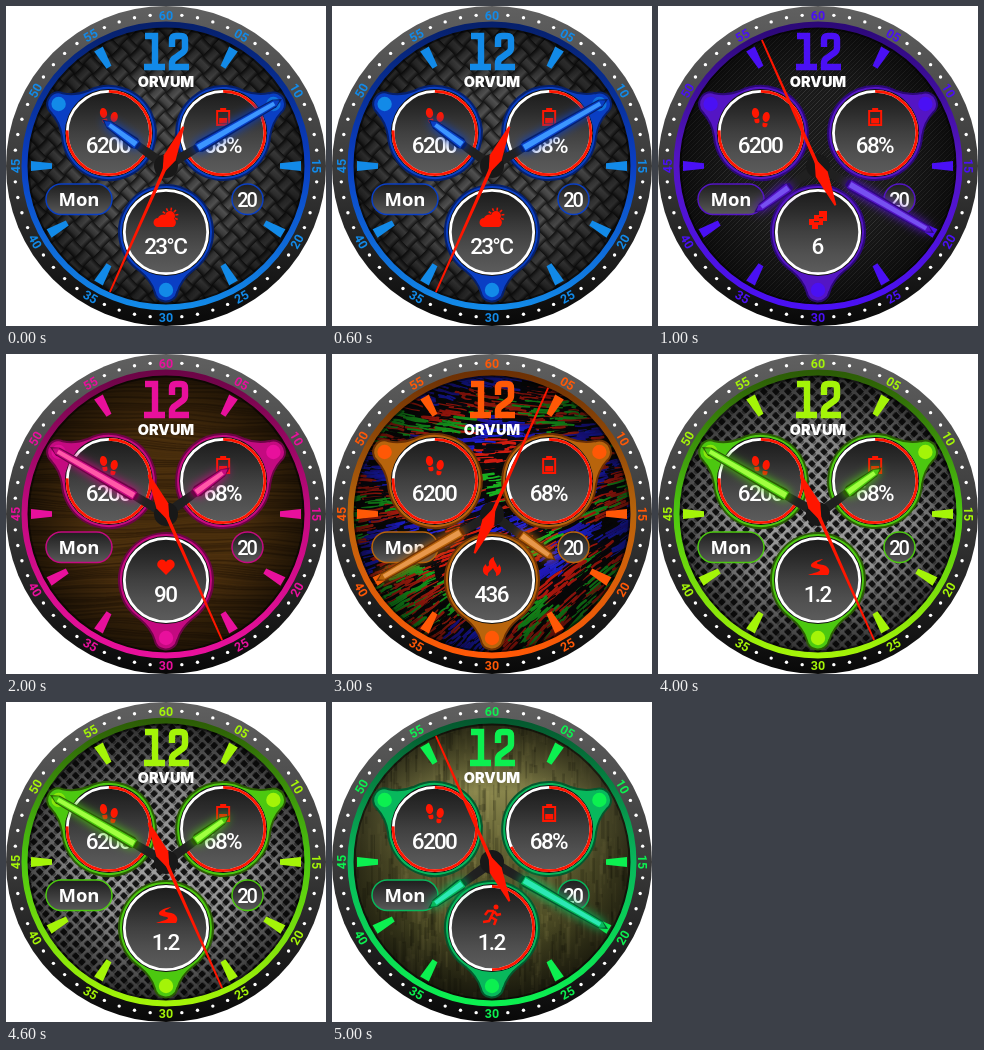
These frames come from a looping animation (320 px wide and 320 px high, 6000 ms). An HTML page with a canvas:

```html
<!DOCTYPE html>
<html lang="en">
<head>
<meta charset="utf-8">
<title>Watch face themes</title>
<style>
  html, body { margin: 0; width: 100%; height: 100%; overflow: hidden; background: #fff; }
  canvas { display: block; width: 320px; height: 320px; }
</style>
</head>
<body>
<canvas id="face" width="320" height="320"></canvas>
<script>
const g = document.getElementById('face').getContext('2d');
const TAU = Math.PI * 2;
const RED = '#ff1600';
const rad = deg => deg * Math.PI / 180;
const at = (deg, r) => [160 + r * Math.sin(rad(deg)), 160 - r * Math.cos(rad(deg))];

function seeded(seed) {
  return () => (seed = (seed * 16807) % 2147483647) / 2147483647;
}

function disc(x, y, r, fill) {
  g.beginPath();
  g.arc(x, y, r, 0, TAU);
  g.fillStyle = fill;
  g.fill();
}

function ring(x, y, r, width, color, from = 0, to = 1) {
  g.beginPath();
  g.arc(x, y, r, from * TAU - TAU / 4, to * TAU - TAU / 4);
  g.lineWidth = width;
  g.strokeStyle = color;
  g.stroke();
}

function placed(x, y, deg, draw) {
  g.save();
  g.translate(x, y);
  g.rotate(rad(deg));
  draw();
  g.restore();
}

function fade(y0, y1, ...colors) {
  const ramp = g.createLinearGradient(0, y0, 0, y1);
  colors.forEach((c, i) => ramp.addColorStop(i / (colors.length - 1), c));
  return ramp;
}

function label(text, x, y, font, color, spacing = 0) {
  g.font = font;
  g.letterSpacing = spacing + 'px';
  g.textAlign = 'center';
  g.textBaseline = 'alphabetic';
  g.fillStyle = color;
  g.fillText(text, x + spacing / 2, y);
  g.letterSpacing = '0px';
}

function polygon(points, fill) {
  g.beginPath();
  points.forEach(([x, y]) => g.lineTo(x, y));
  g.closePath();
  g.fillStyle = fill;
  g.fill();
}

// Dial textures
function base(color) {
  g.fillStyle = color;
  g.fillRect(0, 0, 320, 320);
}

function carbon() {
  base('#161616');
  placed(160, 160, 45, () => {
    const s = 13;
    for (let i = -13; i < 13; i++) for (let j = -13; j < 13; j++) {
      placed((i + .5) * s, (j + .5) * s, (i + j) & 1 ? 90 : 0, () => {
        g.fillStyle = fade(-s / 2, s / 2, '#151515', '#505050', '#404040', '#111');
        g.fillRect(-s / 2, -s / 2 + .5, s, s - 1);
      });
    }
  });
}

function pinstripe() {
  base('#191919');
  g.lineWidth = 1;
  for (let x = -320; x < 320; x += 4) {
    g.strokeStyle = x % 8 ? '#262626' : '#343434';
    g.beginPath();
    g.moveTo(x, 320);
    g.lineTo(x + 320, 0);
    g.stroke();
  }
}

function wood() {
  base('#462c0c');
  const rnd = seeded(71);
  for (let y = 0; y < 320; y += 2) {
    const dark = rnd();
    g.strokeStyle = dark > .5 ? `rgba(24,12,0,${dark * .4})` : `rgba(105,66,20,${dark * .5})`;
    g.lineWidth = 1 + rnd();
    g.beginPath();
    for (let x = 0; x <= 320; x += 10) g.lineTo(x, y + 3 * Math.sin(x / 45 + y / 31) + Math.sin(x / 17 + y / 9));
    g.stroke();
  }
}

function opal() {
  base('#0a0a0a');
  const rnd = seeded(29);
  const colors = ['#1c20d8', '#0a0a14', '#d01c10', '#0a0a0a', '#18b020', '#c02010', '#080808', '#2018b8'];
  g.lineCap = 'round';
  for (let i = 0; i < 4200; i++) {
    const x = rnd() * 320, y = rnd() * 320;
    const tilt = 30 - 90 * (y + x * .3) / 400;
    const across = y * Math.cos(rad(tilt)) - x * Math.sin(rad(tilt));
    const band = across / 13 + 1.5 * Math.sin(x / 27 + y / 41) + Math.sin(x / 15 - y / 22) + rnd() * 2;
    placed(x, y, tilt, () => {
      const half = 4 + rnd() * 8;
      g.strokeStyle = colors[(Math.floor(band) % 8 + 8) % 8];
      line(`M${-half} 0Q0 ${rnd() * 5 - 2.5} ${half} 0`, 1.2 + rnd() * 1.8);
    });
  }
  g.lineCap = 'butt';
}

function tread() {
  base(fade(20, 300, '#6a6a6a', '#a0a0a0', '#707070'));
  placed(160, 160, 45, () => {
    const s = 8.5;
    for (let i = -19; i < 19; i++) for (let j = -19; j < 19; j++) {
      g.fillStyle = 'rgba(30,30,30,.45)';
      if ((i + j) & 1) g.fillRect(i * s - 1, j * s + 1, s, 4);
      else g.fillRect(i * s + 1, j * s - 1, 4, s);
      g.fillStyle = '#141414';
      g.fillRect(i * s, j * s, 5.4, 5.4);
    }
  });
}

function grunge() {
  base(fade(20, 300, '#55532a', '#88854c', '#5c5a2e', '#4c4b24', '#34331a'));
  const rnd = seeded(53);
  for (let i = 0; i < 1300; i++) {
    g.fillStyle = rnd() > .5 ? 'rgba(18,18,6,.2)' : 'rgba(160,155,95,.12)';
    g.fillRect(rnd() * 320, rnd() * 320, 1 + rnd() * 3, 3 + rnd() * 30);
  }
}

// Icons, centred on the origin
const shape = d => g.fill(new Path2D(d));
function line(d, width) {
  g.lineWidth = width;
  g.stroke(new Path2D(d));
}

const icons = {
  feet() {
    for (const [x, y, tilt] of [[-5, -2, -10], [5, 2, 10]]) placed(x, y, tilt, () => {
      g.beginPath();
      g.ellipse(0, -2, 3.6, 5, 0, 0, TAU);
      g.fill();
      g.beginPath();
      g.roundRect(-2.4, 4, 5, 4.4, [0, 0, 2.4, 2.4]);
      g.fill();
    });
  },
  battery() {
    line('M-6 -6H6V8H-6Z', 2);
    g.fillRect(-3, -9, 6, 3);
    g.fillRect(-4, 1, 8, 5.5);
  },
  weather() {
    disc(4, -3, 5, RED);
    for (let a = -60; a < 150; a += 35) placed(4, -3, a, () => g.fillRect(-.8, -8.5, 1.6, 3));
    shape('M-8 8a4.5 4.5 0 0 1 0-9a6 6 0 0 1 11 0a4.5 4.5 0 0 1 4 9Z');
  },
  stairs() {
    shape('M-9 0H-4V-4H1V-8H9V2H5V6H0V10H-6V6H-9Z');
    g.fillStyle = '#333';
    g.fillRect(-4, 2, 5, 1.2);
    g.fillRect(1, -2, 4, 1.2);
  },
  heart() {
    shape('M0 8L-8 0C-11 -5 -4 -11 0 -5C4 -11 11 -5 8 0Z');
  },
  flame() {
    shape('M-4 9C-11 7 -10 0 -6 -3C-6 0 -4 0 -3 -2C-4 -6 -1 -9 2 -10C1 -6 5 -4 5 0C6 0 7 -1 7 -3C11 2 9 8 4 9C5 5 2 4 1 1C-1 4 -5 5 -4 9Z');
  },
  route() {
    shape('M5 -8C-1 -7 -8 -4 -7 -1C-6 2 2 1 2 3C2 5 -5 6 -10 8H10C12 5 12 2 8 -1C5 -3 -1 -2 -1 -4C-1 -5 3 -6 5 -8Z');
  },
  runner() {
    disc(4, -8, 2.5, RED);
    line('M2 -4L-1 2L4 5L2 10M-1 2L-3 6L-9 7M2 -4L-4 -4L-7 0M2 -4L5 0L9 -1', 2.5);
  }
};

// hour, minute and second are angles in degrees
const themes = [
  { main: '#128ae8', pod: '#0a3fc4', deep: '#06206c', lume: '#3c96ff', texture: carbon,
    icon: 'weather', value: '23°C', hour: 306, minute: 60, second: 204 },
  { main: '#4a10f4', pod: '#5415c4', deep: '#2c0878', lume: '#7650f0', texture: pinstripe,
    icon: 'stairs', value: '6', hour: 234, minute: 120, second: 336 },
  { main: '#e8109c', pod: '#c40a80', deep: '#6c0446', lume: '#ff58a8', texture: wood,
    icon: 'heart', value: '90', hour: 54, minute: 300, second: 156 },
  { main: '#ff5806', pod: '#b8640c', deep: '#6c3004', lume: '#e8984c', texture: opal,
    icon: 'flame', value: '436', hour: 126, minute: 240, second: 24 },
  { main: '#a4f408', pod: '#4cc810', deep: '#2c5c06', lume: '#a0ff40', texture: tread,
    icon: 'route', value: '1.2', hour: 54, minute: 300, second: 156 },
  { main: '#0cf050', pod: '#08b85c', deep: '#04582e', lume: '#2ce8b4', texture: grunge,
    icon: 'runner', value: '1.2', progress: .5, hour: 234, minute: 120, second: 336 }
];

function bezel(t) {
  disc(160, 160, 160, fade(0, 320, '#606060', '#3a3a3a', '#080808'));
  for (let m = 0; m < 60; m++) {
    const deg = m * 6;
    if (m % 5) {
      disc(...at(deg, 151.5), 1.7, '#fff');
      continue;
    }
    const flip = m > 15 && m < 45 ? 180 : 0;
    placed(...at(deg, 151), deg + flip, () =>
      label(String(m || 60).padStart(2, '0'), 0, 4.6, '700 12.5px Roboto, sans-serif', t.main));
  }
}

function dial(t) {
  g.save();
  g.beginPath();
  g.arc(160, 160, 143, 0, TAU);
  g.clip();
  t.texture();
  const shade = g.createRadialGradient(160, 160, 75, 160, 160, 143);
  shade.addColorStop(0, 'rgba(0,0,0,0)');
  shade.addColorStop(1, 'rgba(0,0,0,.6)');
  g.fillStyle = shade;
  g.fillRect(0, 0, 320, 320);
  g.restore();
  ring(160, 160, 138, 3, 'rgba(0,0,0,.5)');
  ring(160, 160, 141.5, 6, fade(18, 302, t.deep, t.pod, t.main));

  for (let deg = 30; deg < 360; deg += 30) {
    if ([60, 180, 300].includes(deg)) continue;
    placed(160, 160, deg, () =>
      polygon([[-5, -135], [5, -135], [2.8, -114], [-2.8, -114]], t.main));
  }
  g.strokeStyle = t.main;
  g.lineJoin = 'miter';
  line('M139 30H149V61M138 61H159', 6.4);
  line('M166 41V34Q166 30 170 30H175Q179 30 179 34V42Q179 45 176 47L169 52Q166 54 166 57V61H183', 6.4);
  label('ORVUM', 160, 81, '900 14.5px Inter, sans-serif', '#fff');
}

function pod(t, deg, icon, value, progress) {
  const [x, y] = at(deg, 66);
  placed(x, y, deg, () => {
    g.beginPath();
    g.arc(0, 0, 47, rad(-56), rad(236));
    g.quadraticCurveTo(-15, -48, -11.5, -60);
    g.arc(0, -58, 11.5, rad(190), rad(350));
    g.quadraticCurveTo(15, -48, 26.3, -39);
    g.closePath();
    g.fillStyle = t.pod;
    g.fill();
    g.lineWidth = 2;
    g.strokeStyle = t.deep;
    g.stroke();
  });
  disc(...at(deg, 124), 7.2, t.main);
  disc(x, y, 44, '#111');
  disc(x, y, 41, fade(y - 41, y + 41, '#1c1c1c', '#2c2c2c', '#404040', '#505050', '#5c5c5c'));
  ring(x, y, 41.7, 2.8, '#fff');
  if (progress) ring(x, y, 41.7, 2.8, RED, 0, progress);
  g.fillStyle = g.strokeStyle = RED;
  placed(x, y - (deg === 180 ? 13 : 16), 0, icons[icon]);
  label(value, x, y + (deg === 180 ? 22 : 20), '500 22.5px Roboto, sans-serif', '#fff', -1.7);
}

function dateBadges(t) {
  for (const [x, width] of [[40, 66], [226, 31]]) {
    g.beginPath();
    g.roundRect(x, 178, width, 30.5, 15.2);
    g.fillStyle = fade(178, 208, '#1e1e1e', '#3a3a3a', '#585858');
    g.fill();
    g.lineWidth = 1.5;
    g.strokeStyle = t.pod;
    g.stroke();
  }
  label('Mon', 73, 200, '700 18.5px "Noto Sans", sans-serif', '#fff');
  label('20', 241.5, 200.5, '500 20px Roboto, sans-serif', '#fff', -2);
}

function hand(t, deg, length) {
  placed(160, 160, deg, () => {
    polygon([[-5, 0], [-4, -37], [4, -37], [5, 0]], '#202020');
    g.shadowColor = t.pod;
    g.shadowBlur = 10;
    polygon([[-3, -33], [-6, -39], [-4.2, 9 - length], [0, -length], [4.2, 9 - length], [6, -39], [3, -33]], t.deep);
    g.shadowBlur = 0;
    polygon([[-4.4, -36], [-3.2, 8 - length], [0, 3 - length], [3.2, 8 - length], [4.4, -36]], t.pod);
    polygon([[-2.8, -37], [-2.1, 9 - length], [2.1, 9 - length], [2.8, -37]], t.lume);
  });
}

function secondHand(deg) {
  placed(160, 160, deg, () => {
    polygon([[-.9, -138], [.9, -138], [1.8, 0], [-1.8, 0]], RED);
    polygon([[0, -9], [6.5, 9], [1, 43], [-1, 43], [-6.5, 9]], RED);
  });
}

function drawFace(t) {
  g.clearRect(0, 0, 320, 320);
  bezel(t);
  dial(t);
  pod(t, 300, 'feet', '6200', .76);
  pod(t, 60, 'battery', '68%', .68);
  pod(t, 180, t.icon, t.value, t.progress);
  dateBadges(t);
  hand(t, t.hour, 79);
  hand(t, t.minute, 134);
  disc(160, 160, 12, '#181818');
  secondHand(t.second);
}

const start = performance.now();
let shown = -1;
function tick() {
  const index = Math.floor((performance.now() - start) / 1000) % themes.length;
  if (index !== shown) drawFace(themes[shown = index]);
  requestAnimationFrame(tick);
}
tick();
</script>
</body>
</html>
```
